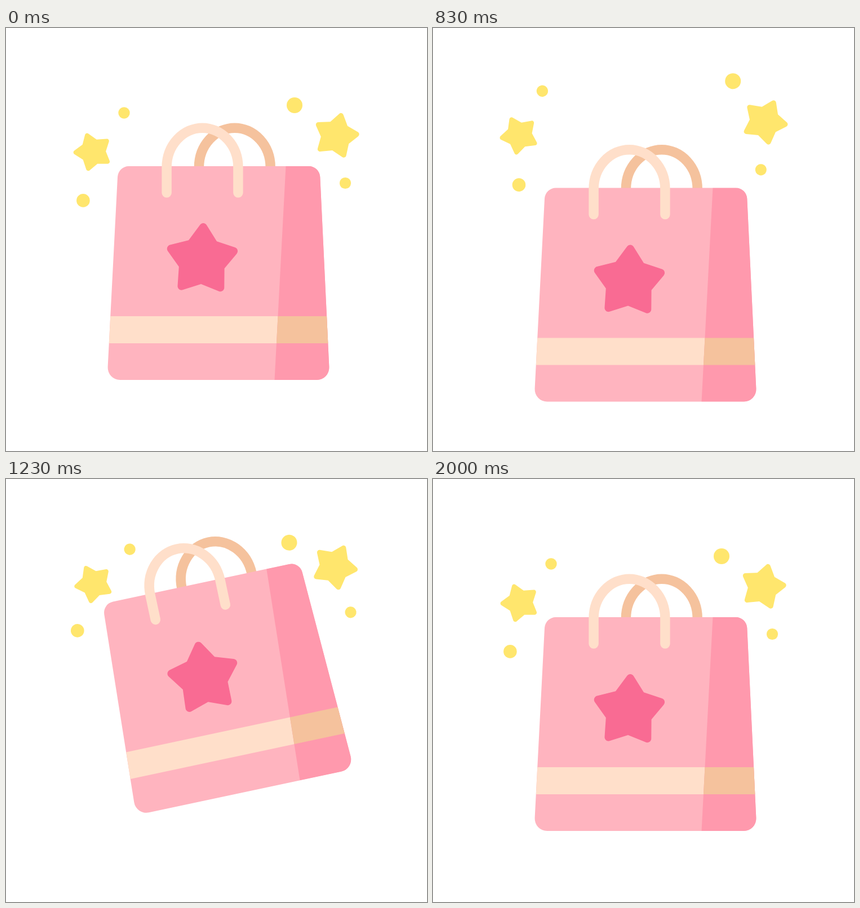
Animation, 747 px wide and 750 px high, one loop 3.01 s. Source, as an HTML page with a canvas:

```html
<!DOCTYPE html>
<html lang="en">
<head>
<meta charset="utf-8">
<title>Shopping bag</title>
<style>
html, body { margin: 0; width: 100%; height: 100%; overflow: hidden; background: #fff; }
canvas { display: block; width: 747px; height: 750px; }
</style>
</head>
<body>
<canvas id="stage" width="747" height="750"></canvas>
<script>
const ctx = document.getElementById('stage').getContext('2d');
const LOOP = 3010, MOTION = 2000, STEP = MOTION / 60;
const BEAT = 5000 / 24;     // the bag moves on this grid
const PHASE = MOTION / 3;   // the sparkles have three equal phases
const STAR_LAG = 8;
const RAD = Math.PI / 180;

const color = {
  pink: '#ffb4bf', rose: '#ff99ad', hot: '#f96b93',
  cream: '#ffdfca', tan: '#f5c29d', yellow: '#ffe66d'
};

// dx, dy: from the pivot to the upper dot; the lower dot lies opposite.
const sparks = [
  { x: 173.2, y: 228.2, dx: 36.3, dy: -77.7, upper: 10.2, lower: 11.8, turn: [-14.5, 9],
    star: { x: -18.7, y: -8.7, scale: 0.533, angle: -110, spin: -294.5 } },
  { x: 557, y: 206, dx: -45, dy: -69, upper: 14, lower: 10.1, turn: [20, -10],
    star: { x: 28.5, y: -15, scale: 0.63, angle: -4, spin: 299.5 } }
];

// Sine ease from 0 to 1 between two times.
function ease(t, from, to) {
  const u = Math.min(Math.max((t - from) / (to - from), 0), 1);
  return (1 - Math.cos(Math.PI * u)) / 2;
}

// From 0 to a, on to b, and back to 0, one phase each.
function swing(t, a, b) {
  return a * ease(t, 0, PHASE)
    + (b - a) * ease(t, PHASE, 2 * PHASE)
    - b * ease(t, 2 * PHASE, MOTION);
}

// Five-pointed star with rounded tips and sharp notches.
function drawStar(x, y, scale, angle, fill) {
  const at = (i, r) => {
    const a = (36 * i) * RAD;
    return [r * Math.cos(a), r * Math.sin(a)];
  };
  ctx.save();
  ctx.translate(x, y);
  ctx.rotate(angle * RAD);
  ctx.scale(scale, scale);
  ctx.beginPath();
  ctx.moveTo(...at(-1, 42.5));
  for (let i = 0; i < 10; i += 2) {
    const notch = at(i + 1, 42.5);
    ctx.arcTo(...at(i, 71), ...notch, 7);
    ctx.lineTo(...notch);
  }
  ctx.closePath();
  ctx.fillStyle = fill;
  ctx.fill();
  ctx.restore();
}

function drawDot(x, y, r) {
  ctx.beginPath();
  ctx.arc(x, y, r, 0, 2 * Math.PI);
  ctx.fillStyle = color.yellow;
  ctx.fill();
}

function drawHandle(x, foot, stroke) {
  const rx = 63.4, ry = 69.8, base = 247;
  ctx.strokeStyle = stroke;
  ctx.lineWidth = 17.5;
  ctx.lineCap = 'round';
  ctx.beginPath();
  ctx.moveTo(x - rx, foot);
  ctx.ellipse(x, base, rx, ry, 0, Math.PI, 2 * Math.PI);
  ctx.lineTo(x + rx, foot);
  ctx.stroke();
}

function rect(fill, x, y, w, h) {
  ctx.fillStyle = fill;
  ctx.fillRect(x, y, w, h);
}

function drawBody() {
  const top = 245, bottom = 624;
  ctx.save();
  ctx.beginPath();
  ctx.moveTo(370, top);
  ctx.arcTo(556.4, top, 574.5, bottom, 20);
  ctx.arcTo(574.5, bottom, 179.4, bottom, 22);
  ctx.arcTo(179.4, bottom, 199, top, 22);
  ctx.arcTo(199, top, 370, top, 20);
  ctx.closePath();
  ctx.fillStyle = color.pink;
  ctx.fill();
  ctx.clip();
  rect(color.cream, 150, 511, 450, 48);

  ctx.beginPath();
  ctx.moveTo(496.5, top);
  ctx.lineTo(600, top);
  ctx.lineTo(600, bottom);
  ctx.lineTo(476.5, bottom);
  ctx.closePath();
  ctx.fillStyle = color.rose;
  ctx.fill();
  ctx.clip();
  rect(color.tan, 450, 511, 150, 48);
  ctx.restore();
}

function drawBag(t) {
  const stage = (from, to) => ease(t, from * BEAT, to * BEAT);
  const crouch = stage(0, 2), leap = stage(4, 5), tilt = stage(5, 6), land = stage(6, 7);

  ctx.save();
  ctx.translate(377, 397 + 38.5 * crouch - 102.5 * leap + 64 * land);
  ctx.rotate(-12.2 * (tilt - land) * RAD);
  ctx.translate(-377, -397);
  drawHandle(405.8, 250, color.tan);
  drawBody();
  drawHandle(348.5, 292, color.cream);
  drawStar(347.7, 411.6, 1, -87.8, color.hot);
  ctx.restore();
}

function drawSparks({ x, y, dx, dy, upper, lower, turn, star }, t) {
  const angle = swing(t, ...turn);
  const spin = swing(t - STAR_LAG, star.spin, star.spin);
  ctx.save();
  ctx.translate(x, y + swing(t, -33.6, -31.3));
  ctx.rotate(angle * RAD);
  drawDot(dx, dy, upper);
  drawDot(-dx, -dy, lower);
  // The star keeps its own heading while the group turns.
  const settled = t < MOTION ? spin : 0;
  drawStar(star.x, star.y, star.scale, star.angle + settled - angle, color.yellow);
  ctx.restore();
}

function draw(ms) {
  const t = Math.min(Math.floor((ms + 3.4) / STEP) * STEP, MOTION);
  rect('#fff', 0, 0, 747, 750);
  drawBag(t);
  for (const group of sparks) drawSparks(group, t);
}

const start = performance.now();
function tick() {
  draw((performance.now() - start) % LOOP);
  requestAnimationFrame(tick);
}
tick();
</script>
</body>
</html>
```
